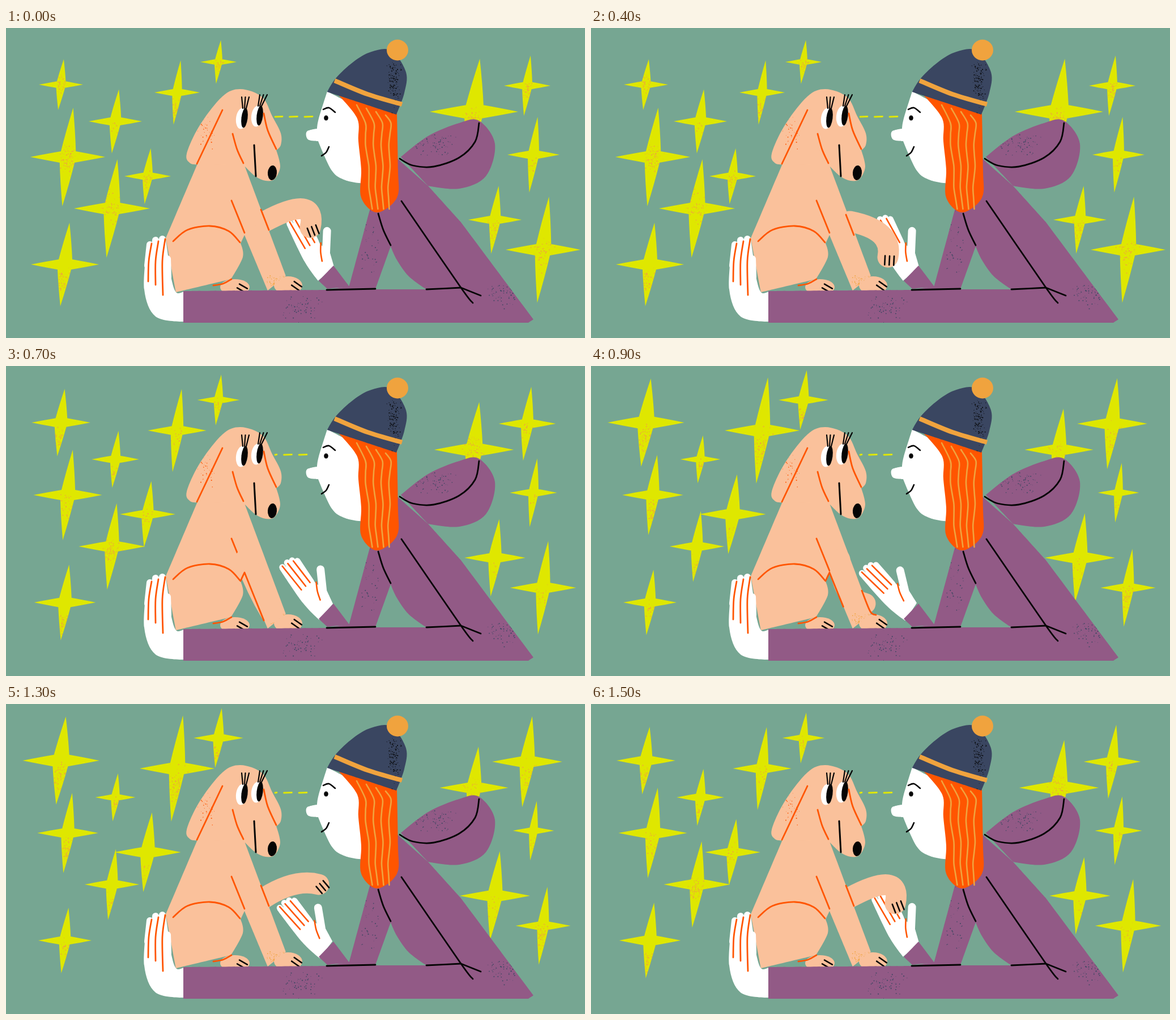
An HTML page with a canvas that plays this animation: 1022 by 548 pixels, repeating every 1600 ms.

```html
<!DOCTYPE html>
<html lang="en">
<head>
<meta charset="utf-8">
<title>High five</title>
<style>
html, body { margin: 0; width: 100%; height: 100%; overflow: hidden; background: #76a692; }
canvas { display: block; }
</style>
</head>
<body>
<canvas id="stage" width="1022" height="548"></canvas>
<script>
const ctx = document.getElementById("stage").getContext("2d");
const STEP = 100, FRAMES = 16;
const GREEN = "#76a692", YELLOW = "#dfe700", PEACH = "#fac19b", ORANGE = "#ff5500";
const PURPLE = "#925a86", NAVY = "#3a4661", GOLD = "#f0a33e", WHITE = "#fff", BLACK = "#050505";

const lerp = (a, b, t) => a + (b - a) * t;
const radians = degrees => degrees * Math.PI / 180;

function seeded(seed) {
  let s = (seed * 7919 + 12345) >>> 0;
  return () => {
    s = (s + 0x6d2b79f5) >>> 0;
    let r = Math.imul(s ^ (s >>> 15), 1 | s);
    r = (r + Math.imul(r ^ (r >>> 7), 61 | r)) ^ r;
    return ((r ^ (r >>> 14)) >>> 0) / 4294967296;
  };
}

// Smooth path through "x,y" points; a trailing "!" makes a sharp corner.
function smooth(text, closed) {
  const points = text.split(" ").map(s => {
    const [x, y] = s.split(",").map(parseFloat);
    return { x, y, sharp: s.endsWith("!") };
  });
  const path = new Path2D(), n = points.length;
  const at = i => closed ? points[(i + n) % n] : points[Math.max(0, Math.min(n - 1, i))];
  const handle = (i, dir) => {
    const p = at(i), k = p.sharp ? 0 : dir / 6;
    return [p.x + (at(i + 1).x - at(i - 1).x) * k, p.y + (at(i + 1).y - at(i - 1).y) * k];
  };
  path.moveTo(points[0].x, points[0].y);
  for (let i = 0; i < (closed ? n : n - 1); i++) {
    const end = at(i + 1);
    path.bezierCurveTo(...handle(i, 1), ...handle(i + 1, -1), end.x, end.y);
  }
  if (closed) path.closePath();
  return path;
}

function shape(color, text) {
  const path = smooth(text, true);
  ctx.fillStyle = color;
  ctx.fill(path);
  return path;
}

function lines(color, width, ...texts) {
  ctx.strokeStyle = color;
  ctx.lineWidth = width;
  for (const text of texts) ctx.stroke(smooth(text, false));
}

function oval(color, x, y, rx, ry, tilt = 0) {
  ctx.fillStyle = color;
  ctx.beginPath();
  ctx.ellipse(x, y, rx, ry, tilt, 0, Math.PI * 2);
  ctx.fill();
}

function speckle(path, color, x, y, rx, ry, count) {
  const rnd = seeded(x * 3 + y + count), spread = () => rnd() + rnd() + rnd() - 1.5;
  ctx.save();
  ctx.clip(path);
  ctx.fillStyle = color;
  for (let i = 0; i < count; i++) {
    const size = 0.6 + rnd() * 1.2;
    ctx.fillRect(x + spread() * rx, y + spread() * ry, size, size);
  }
  ctx.restore();
}

function claws(x, y, angle, count) {
  const cos = Math.cos(radians(angle)), sin = Math.sin(radians(angle));
  for (let i = 0; i < count; i++) {
    const k = 8 * (i - (count - 1) / 2), cx = x + k * sin, cy = y - k * cos;
    lines(BLACK, 2.6, `${cx - 8 * cos},${cy - 8 * sin} ${cx + 8 * cos},${cy + 8 * sin}`);
  }
}

// x, y, half width at both ends of the twinkle, height to width
const stars = [
  [97, 100, 39, 83, 1.15], [193, 165, 47, 29, 1.2], [109, 228, 66, 47, 1.32], [250, 262, 41, 68, 1.2],
  [187, 319, 67, 38, 1.3], [104, 418, 60, 40, 1.23], [302, 114, 40, 80, 1.42], [375, 60, 32, 50, 1.2],
  [826, 148, 78, 51, 1.2], [920, 102, 41, 73, 1.3], [931, 224, 46, 31, 1.45], [863, 339, 47, 70, 1.27],
  [948, 392, 66, 39, 1.42]
];
const twinkle = [0, .65, 1, .29];

function drawStar([x, y, from, to, aspect], index, phase) {
  const w = lerp(from, to, twinkle[phase]), h = w * aspect;
  const path = new Path2D();
  const place = (u, v) => [x + u - .11 * v, y + v];
  path.moveTo(...place(0, -h));
  for (const [sx, sy, upright] of [[1, -1, 1], [1, 1, 0], [-1, 1, 1], [-1, -1, 0]]) {
    const blade = place(sx * .13 * w, sy * .5 * h), arm = place(sx * .55 * w, sy * .09 * w);
    const corner = place(sx * .2 * w, sy * .15 * w);
    path.quadraticCurveTo(...(upright ? blade : arm), ...corner);
    path.quadraticCurveTo(...(upright ? arm : blade), ...(upright ? place(sx * w, 0) : place(0, sy * h)));
  }
  ctx.fillStyle = YELLOW;
  ctx.fill(path);
  const rnd = seeded(index * 4 + phase + 3);
  speckle(path, GOLD, x, y + h * (rnd() * .7 - .1), w * .25, h * .3, Math.round(h * (.2 + rnd() * 1.2)));
}

function drawGaze(shifted) {
  for (let k = 0; k < 3; k++) {
    const x = 474 + 26.5 * k - (shifted ? 10 : 0);
    lines(YELLOW, 2.8, `${Math.max(475, x)},157 ${x + 14},156.5`);
  }
}

function drawEye(x, y, lean) {
  oval(WHITE, x, y, 10, 18.5, .12);
  oval(BLACK, x + 5, y - 1, 5.5, 17.5, .12);
  for (let k = 0; k < 3; k++) {
    lines(BLACK, 2.2, `${x + 2 + 3 * k},${y - 18} ${x + lean + 6.5 * k},${y - 38}`);
  }
}

function drawDog() {
  const head = shape(PEACH, "382,121 414,108 452,122 470,156 485,186 485,207 477,216! 484,245 474,267 458,270 " +
    "440,262 422,245! 338,241! 325,239 319,222 342,172");
  const body = shape(PEACH, "338,240! 421,243! 494,438! 462,464! 421,366! 414,381! 418,405 397,444! 300,467! 282,372!");
  oval(PEACH, 404, 458, 26, 14);
  oval(PEACH, 498, 455, 25, 16);
  speckle(head, ORANGE, 352, 182, 16, 28, 35);
  speckle(body, GOLD, 480, 449, 20, 14, 60);
  drawEye(416, 160, 0);
  drawEye(443, 156, 5);
  lines(BLACK, 3, "438,207 441,262");
  oval(BLACK, 470, 256, 8, 13, .08);
  lines(ORANGE, 2.8, "382,145 337,240", "455,151 462,181 477,214", "400,187 408,215 419,239",
    "398,305 421,362", "295,377 320,357 360,350 393,359 413,379", "366,455 383,452 398,444");
  claws(417, 460, 30, 2);
  claws(513, 456, 35, 2);
}

function drawBackHand() {
  shape(WHITE, "313,519! 264,510 244,462 249,385! 282,374! 287,408 293,448 301,468 313,466!");
  lines(WHITE, 12, "254,383 250,420", "264,375 262,410", "276,373 276,410", "285,408 286,440");
  for (let k = 0; k < 3; k++) {
    lines(ORANGE, 2.8, `${257 + 12 * k},${381 - 4 * k} ${252 + 12 * k},412 ${251 + 13 * k},${448 + 6 * k * k}`);
  }
}

function drawBody() {
  const hood = shape(PURPLE, "697,228! 745,191 800,168 835,164 863,205 847,262 800,284 745,279!");
  const body = shape(PURPLE, "690,230! 745,279! 802,342! 931,515! 922,521! 313,521! 313,465! 567,463! 606,456! 642,322!");
  shape(GREEN, "679,386! 690,410 711,439 742,462! 652,462!");
  speckle(hood, NAVY, 755, 205, 35, 18, 70);
  speckle(body, NAVY, 640, 385, 18, 50, 40);
  speckle(body, NAVY, 520, 495, 32, 18, 65);
  speckle(body, NAVY, 878, 468, 28, 24, 60);
  lines(BLACK, 2.8, "695,231 718,243 755,245 800,229 828,201 835,168", "657,328 666,357 679,384",
    "698,306 803,459 824,486", "742,462 803,459! 838,473", "566,463 652,461");
}

function drawHead() {
  shape(WHITE, "567,112! 552,160 549,178! 531,183 533,197 551,200! 575,252 599,269 630,275! 640,150!");
  oval(BLACK, 565, 159, 3.8, 4.6);
  lines(BLACK, 2.6, "560,144 570,141 581,149", "557,226 565,220 570,210");

  shape(ORANGE, "588,120! 620,160 622,200 627,250 627,300 655,326 690,300 692,250 690,150! 650,125!");
  for (let k = 0; k < 4; k++) {
    let strand = `${619 + 17 * k},${136 + 6 * k}`;
    for (let y = 168; y <= 320; y += 19) {
      strand += ` ${lerp(633 + 15 * k, 645 + 10 * k, (y - 168) / 152) + 1.5 * Math.sin(y / 12)},${y}`;
    }
    lines(GOLD, 2.6, strand);
  }

  const hat = shape(NAVY, "567,113! 582,89 613,60 645,42 680,40 706,78 703,115 689,153! 610,127!");
  speckle(hat, BLACK, 684, 95, 10, 40, 130);
  ctx.lineCap = "butt";
  lines(GOLD, 8, "580,93 638,117 699,135");
  ctx.lineCap = "round";
  oval(GOLD, 691, 39, 19, 18.5);
}

// The dog's arm bends towards (bendX, bendY) and ends at the paw; turn rotates the woman's hand.
const slap = { frame: 0, bendX: 550, bendY: 292, pawX: 537, pawY: 353, claw: 69, turn: 5 };
const poses = [
  slap,
  { frame: 4, bendX: 534, bendY: 357, pawX: 524, pawY: 405, claw: 93, turn: 5 },
  { frame: 6, bendX: 443, bendY: 388, pawX: 459, pawY: 444, claw: 80, turn: 0 },
  { frame: 9, bendX: 442, bendY: 410, pawX: 484, pawY: 420, claw: 75, turn: -11 },
  { frame: 11, bendX: 544, bendY: 312, pawX: 552, pawY: 352, claw: 63, turn: -11 },
  { frame: 13, bendX: 511, bendY: 308, pawX: 552, pawY: 319, claw: 50, turn: -7 },
  { ...slap, frame: 15 }
];

function poseAt(frame) {
  const i = Math.max(1, poses.findIndex(p => p.frame >= frame));
  const a = poses[i - 1], b = poses[i], t = (frame - a.frame) / (b.frame - a.frame);
  return Object.fromEntries(Object.keys(a).map(key => [key, lerp(a[key], b[key], t)]));
}

function drawHand(turn) {
  ctx.save();
  ctx.translate(565, 435);
  ctx.rotate(radians(turn));
  ctx.translate(-565, -435);
  shape(WHITE, "552,448! 525,416 488,354! 524,343! 550,383! 569,398! 578,421!");
  lines(WHITE, 14, "560,359 562,405");
  for (let k = 0; k < 4; k++) {
    lines(WHITE, 11, `${493 + 9 * k},${351 - 10 * k + 2.3 * k * k} ${527 + 5 * k},${398 - 6 * k}`);
  }
  for (let k = 0; k < 3; k++) {
    lines(ORANGE, 2.6, `${493 + 10 * k},${349 - 4 * k} ${524 + 8 * k},${393 - 6 * k}`);
  }
  lines(ORANGE, 2.6, "551,381 552,397 556,413");
  ctx.restore();
  shape(PURPLE, "578,420! 552,447! 567,461! 606,457!");
}

function drawArm({ bendX, bendY, pawX, pawY, claw }) {
  const raised = pawX > 490, shoulderX = Math.min(457, pawX - 45);
  ctx.strokeStyle = PEACH;
  ctx.lineWidth = 37;
  ctx.beginPath();
  ctx.moveTo(shoulderX, 342);
  ctx.quadraticCurveTo(bendX, bendY, pawX, pawY);
  ctx.stroke();

  if (raised) {
    const y = lerp(339, 348, Math.max(0, (bendY - 312) / 45));
    lines(ORANGE, 2.8, `450,${y - 18} 464,${y + 18}`);
    claws(pawX + 3 + 6 * Math.cos(radians(claw)), pawY + 6 * Math.sin(radians(claw)), claw, 3);
  } else {
    const hidden = 1 - (pawX - 459) * .015;
    lines(ORANGE, 2.8, `414,380 421,365! ${lerp(421, 460, hidden)},${lerp(365, 462, hidden)}`);
    if (pawX > 470) lines(ORANGE, 2.8, "478,397 493,434 503,440");
  }
}

function draw(frame) {
  const pose = poseAt(frame), phase = frame % twinkle.length;
  ctx.lineCap = ctx.lineJoin = "round";
  ctx.fillStyle = GREEN;
  ctx.fillRect(0, 0, 1022, 548);
  stars.forEach((star, i) => drawStar(star, i, phase));
  drawGaze(phase % 2 === 1);
  drawDog();
  drawBackHand();
  drawBody();
  drawHead();
  drawHand(pose.turn);
  drawArm(pose);
}

let shown = -1;
function tick(now) {
  const frame = Math.floor(Math.max(0, now) / STEP) % FRAMES;
  if (frame !== shown) draw(shown = frame);
  requestAnimationFrame(tick);
}
tick(0);
</script>
</body>
</html>
```
